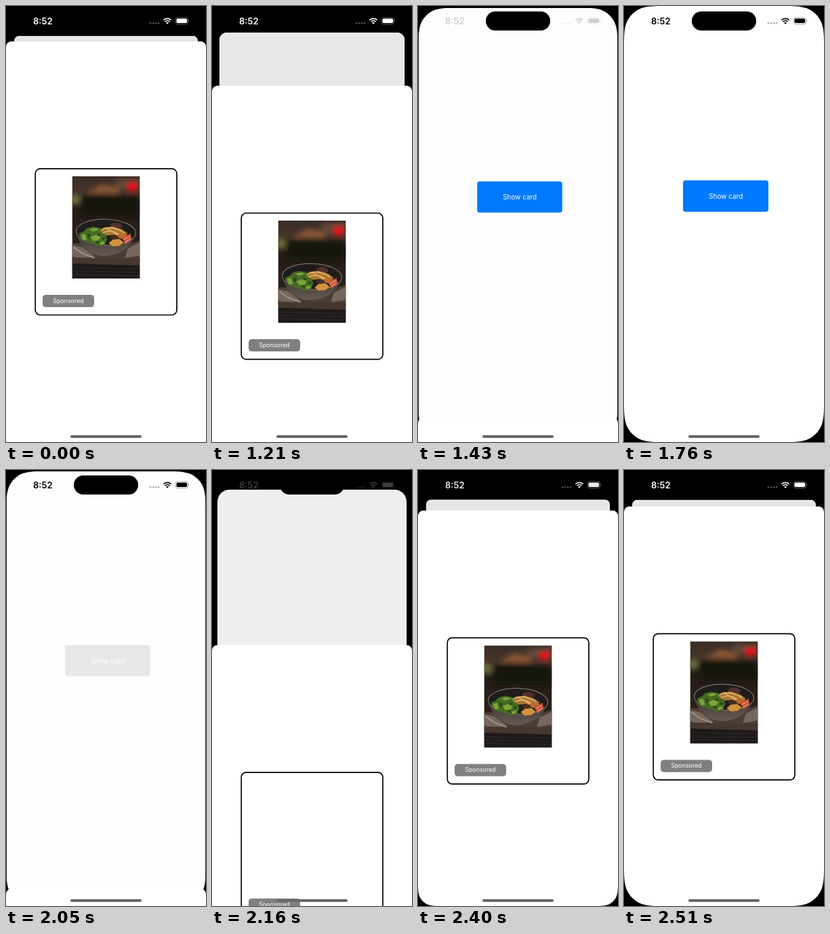
An HTML page for the animation above (2590 ms loop, 295 by 640 pixels).

```html
<!DOCTYPE html>
<html lang="en">
<head>
<meta charset="utf-8">
<title>Card sheet</title>
<style>
  html, body { margin: 0; width: 100%; height: 100%; overflow: hidden; background: #000; }
  body { font-family: Inter, Roboto, sans-serif; }
  div, svg { position: absolute; box-sizing: border-box; }
  #stage { left: 0; top: 0; width: 295px; height: 640px; overflow: hidden; background: #000; }
  #back { width: 295px; height: 640px; background: #fff; transform-origin: 50% 0; }
  #dim { inset: 0; background: #000; }
  #button {
    left: 87px; top: 256px; width: 126.4px; height: 46px; border-radius: 3.75px;
    color: #fff; font-size: 10px; line-height: 46px; text-align: center;
  }
  #island { left: 100.2px; top: 8.3px; width: 94.4px; height: 27.9px; border-radius: 14px; background: #000; }
  #sheet { width: 295px; height: 660px; border-radius: 8px 8px 0 0; background: #fff; }
  #card { left: 0; top: 0; }
  #tag {
    left: 54px; top: 372px; width: 76px; height: 18px; border-radius: 4.5px;
    background: #808080; color: #fff; font-size: 8.9px; line-height: 18px; text-align: center;
  }
  #status { left: 0; top: 0; }
  #home { left: 95px; top: 630px; width: 105px; height: 4px; border-radius: 2px; background: #686868; }
</style>
</head>
<body>
<div id="stage">
  <div id="back">
    <div id="button">Show card</div>
    <div id="dim"></div>
  </div>
  <div id="island"></div>
  <div id="sheet">
    <svg id="card" width="295" height="420">
      <defs>
        <linearGradient id="room" x2="0" y2="1">
          <stop offset="0" stop-color="#3a2d26"/>
          <stop offset=".2" stop-color="#4a372b"/>
          <stop offset=".32" stop-color="#261c17"/>
          <stop offset="1" stop-color="#2a2220"/>
        </linearGradient>
        <linearGradient id="bowl" x2="0" y2="1">
          <stop offset="0" stop-color="#39332f"/>
          <stop offset="1" stop-color="#675b53"/>
        </linearGradient>
        <filter id="soft" x="-50%" y="-50%" width="200%" height="200%"><feGaussianBlur stdDeviation="3.5"/></filter>
        <clipPath id="frame"><path d="M0 0h100v150H0z"/></clipPath>
      </defs>
      <rect x="43.25" y="186.9" width="208.7" height="214.6" rx="7.2" fill="none" stroke="#000" stroke-width="1.7"/>
      <g id="photo" transform="translate(97.5 198)" clip-path="url(#frame)">
        <path fill="url(#room)" d="M0 0h100v150H0z"/>
        <g filter="url(#soft)">
          <path fill="#8a5636" d="M22 24 44 12 74 17 66 25z"/>
          <ellipse cx="4" cy="34" rx="7" ry="7" fill="#69733a"/>
          <path fill="#5f4638" d="M64 4h36v14H64z"/>
          <path fill="#19120e" d="M14 28h86v30H14z"/>
          <ellipse cx="89" cy="15" rx="9" ry="7" fill="#d5131f"/>
        </g>
        <ellipse cx="89" cy="15" rx="6" ry="5" fill="#e0161f" opacity=".5"/>
        <path fill="#4b3d35" d="M0 98 18 98 82 100 100 94V126H0z"/>
        <path fill="#75675d" d="M0 101 15 104 34 118 8 122 0 116zM82 106l18-9v19l-22 4z"/>
        <path fill="#46372f" d="M0 119 100 121V131L0 128z"/>
        <path fill="#1f1a1a" d="M0 128 100 131V150H0z"/>
        <path stroke="#45403f" stroke-width=".8" stroke-dasharray="2 2" d="M0 134 100 136M0 139l100 2M0 144l100 2"/>
        <path fill="none" stroke="#a6998e" stroke-width="1.6" d="M2 104 15 113 33 120"/>
        <path fill="url(#bowl)" d="M6 80C8 101 28 117 46 117 68 117 91 104 94 81z"/>
        <ellipse cx="50" cy="82" rx="44" ry="19" fill="#1f1d1b" stroke="#77716a" stroke-width="1.2" transform="rotate(2 50 82)"/>
        <path fill="#456b22" d="M10 84 17 81 22 76 31 74 42 76 48 82 52 92 48 101 38 103 29 98 20 97 13 92z"/>
        <path fill="#7da33b" d="M13 86l6-2 3 9-6 1zM25 78l9-2 6 2-9 3zM27 89l8-3 7 3-3 5-8 1zM41 97l6-2 1 4-7 2z"/>
        <path fill="#2c461a" d="M22 84l6 1-3 7zM37 83l6 3-5 2zM33 96l6-1 1 5zM44 89l6 2-5 3z"/>
        <ellipse cx="65" cy="73" rx="9" ry="5" fill="#53302a"/>
        <path fill="#a97736" d="M41 80 47 75 60 74 74 78 82 84 74 90 62 86 51 87z"/>
        <path fill="none" stroke="#e2b566" stroke-width="1.5" d="M43 79q9-7 27 0M45 83q12-6 24 2M50 76l18 10M58 75q10 2 19 8"/>
        <path fill="#4a2d20" d="M55 88 66 87 72 92 60 94z"/>
        <path fill="#d3923b" d="M54 98 60 93 70 92 76 97 70 102 60 103z"/>
        <ellipse cx="75" cy="88" rx="7" ry="4" fill="#bd692d"/>
        <path fill="#c94f38" d="M74 91 86 84l2 8-9 8z"/>
        <path stroke="#eea37c" stroke-width="1.2" d="M76 93l9-5M78 97l8-5"/>
      </g>
    </svg>
    <div id="tag">Sponsored</div>
  </div>
  <svg id="status" width="295" height="44" fill="currentColor">
    <text x="40" y="26.6" font-size="13" font-weight="600">8:52</text>
    <g opacity=".3">
      <circle cx="213" cy="25.2" r="1.35"/><circle cx="217" cy="25.2" r="1.35"/>
      <circle cx="221" cy="25.2" r="1.35"/><circle cx="225" cy="25.2" r="1.35"/>
    </g>
    <g fill="none" stroke="currentColor" stroke-width="1.8">
      <path d="M232.4 20.6a8 8 0 0 1 11.2 0M234.6 23a5 5 0 0 1 6.8 0"/>
    </g>
    <path d="M238 26.8l-2-2.2a3 3 0 0 1 4 0z"/>
    <rect x="250" y="17" width="18.6" height="9.6" rx="3" fill="none" stroke="currentColor" stroke-width=".9" opacity=".4"/>
    <rect x="251.5" y="18.5" width="15.6" height="6.6" rx="1.8"/>
    <path d="M269.7 20.2q1.6 1.6 0 3.2z" opacity=".45"/>
  </svg>
  <div id="home"></div>
</div>
<script>
  const LOOP = 2590, W = 295, H = 640, SCREEN = 41.3;
  // [time, status bar grey, bottom corner radius]
  const STEPS = [
    [0, 255, 0], [1210, 255, 0], [1320, 255, 0], [1430, 207, 0], [1540, 110, 0], [1650, 30, 0],
    [1760, 0, 0], [1940, 0, 0], [2050, 0, 0], [2160, 60, 0], [2270, 165, 4], [2400, 235, 24], [2510, 255, SCREEN]
  ];
  const CLOSE = 1178.4, OPEN = 2031, PRESS = 1940, LOADED = 2400;
  const el = id => document.getElementById(id);
  const [stage, back, dim, button, sheet, photo, status] =
    ['stage', 'back', 'dim', 'button', 'sheet', 'photo', 'status'].map(el);

  // Continuous corner for radius 1, from the horizontal edge to the vertical one
  const CURVE = [
    [1.529, 0], [1.088, 0], [0.868, 0], [0.631, 0.075], [0.373, 0.169],
    [0.169, 0.373], [0.075, 0.631], [0, 0.868], [0, 1.088], [0, 1.529]
  ];

  function corner(right, bottom, r) {
    const points = CURVE.map(([a, b]) => [right ? W - a * r : a * r, bottom ? H - b * r : b * r]);
    if (right === bottom) points.reverse();
    return `${points[0]} C${points.slice(1).join(' ')}`;
  }

  const outline = (top, bottom) => `path("M${[
    corner(false, false, top), corner(true, false, top),
    corner(true, true, bottom), corner(false, true, bottom)
  ].join(' L')} Z")`;

  // Critically damped spring: what is left of the move after ms
  const rest = (ms, rate) => {
    const x = Math.max(0, ms) * rate / 1000;
    return (1 + x) * Math.exp(-x);
  };

  function shown(t) {
    if (t < 1210) return 1;
    if (t >= OPEN) return 1 - rest(t - OPEN, 17.25);
    return t < 1760 ? rest(t - CLOSE, 17.9) : 0;
  }

  function draw([t, grey, radius]) {
    const p = shown(t);
    const round = SCREEN - 33 * p;
    sheet.style.transform = `translateY(${H - 588 * p}px)`;
    back.style.transform = `translateY(${43.7 * p}px) scale(${1 - 0.0814 * p})`;
    back.style.clipPath = outline(round, round);
    dim.style.opacity = 0.1 * p;
    button.style.background = t < PRESS ? '#007aff' : t < OPEN ? '#cce4ff' : '#e8e8e8';
    photo.style.visibility = t < 1760 || t >= LOADED ? 'visible' : 'hidden';
    status.style.color = `rgb(${grey},${grey},${grey})`;
    stage.style.clipPath = outline(0, radius);
  }

  const start = performance.now();
  let last;
  function tick() {
    const t = (performance.now() - start) % LOOP;
    const step = STEPS.findLast(s => s[0] <= t);
    if (step !== last) draw(last = step);
    requestAnimationFrame(tick);
  }
  tick();
</script>
</body>
</html>
```
